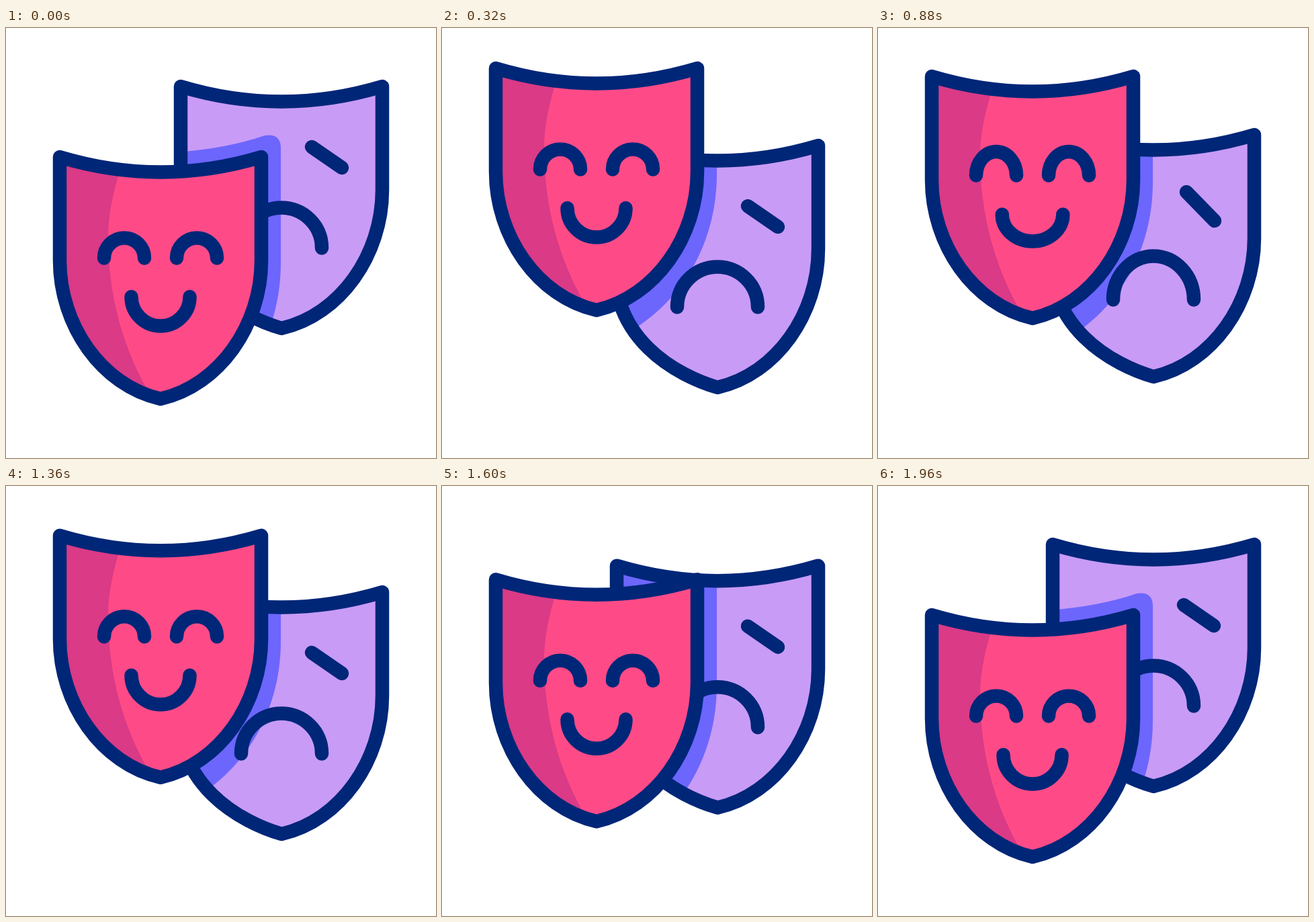
Animation, 640 px wide and 640 px high, one loop 2 s. Source, as an HTML page with a canvas:

```html
<!DOCTYPE html>
<html>
<head>
<meta charset="utf-8">
<style>
html, body { margin: 0; width: 100%; height: 100%; overflow: hidden; background: #fff; }
canvas { display: block; width: 100vmin; height: 100vmin; }
</style>
</head>
<body>
<canvas id="stage" width="640" height="640"></canvas>
<script>
const ctx = document.getElementById('stage').getContext('2d');
const LOOP = 2000, STEP = 40;
const NAVY = '#002678', PINK = '#fe4b87', ROSE = '#da3a86', LILAC = '#c89bf6', BLUE = '#6c66fd';

// Both masks share the top and right side; the sad one bulges at the lower left.
const outline = 'M80 192Q230 237 380 192V346C380 442 318 532 230 552';
const happy = new Path2D(outline + 'C142 532 80 442 80 346Z');
const sad = new Path2D(outline + 'C175 536 60 480 80 346Z');
const shade = new Path2D('M172 205Q152 265 152 310C152 400 175 478 214 545L60 560V180Z');
const shadow = new Path2D('M200 187Q310 186 385 160Q409 156 409 179V350C409 450 358 555 240 604L200 604Z');

// Keys are [time, value] pairs, joined by sine easing.
function tween(t, keys) {
  let [t0, v0] = keys[0];
  for (const [t1, v1] of keys) {
    if (t < t1) return v0 + (v1 - v0) * (1 - Math.cos(Math.PI * Math.max(0, (t - t0) / (t1 - t0)))) / 2;
    [t0, v0] = [t1, v1];
  }
  return v0;
}

const slide = (t, peak, rest) =>
  tween(t, [[80, 0], [320, peak], [530, rest], [1320, rest], [1840, 0]]);

function at(x, y, draw) {
  ctx.save();
  ctx.translate(x, y);
  draw();
  ctx.restore();
}

function fill(path, color) {
  ctx.fillStyle = color;
  ctx.fill(path);
}

const line = d => ctx.stroke(new Path2D(d));

// Half ellipse between two ends; sweep 1 arches up, 0 hangs down.
const arc = (x, y, rx, ry, sweep) => line(`M${x - rx} ${y}A${rx} ${ry} 0 0 ${sweep} ${x + rx} ${y}`);

function draw(t) {
  const front = slide(t, -132, -120);
  const back = slide(t, 88, 72);
  const mood = tween(t, [[640, 0], [760, 1], [1000, 0]]);

  ctx.clearRect(0, 0, 640, 640);
  ctx.strokeStyle = NAVY;
  ctx.lineWidth = 20.5;
  ctx.lineCap = ctx.lineJoin = 'round';

  at(180, back - 105, () => {
    fill(sad, LILAC);
    ctx.save();
    ctx.clip(sad);
    ctx.translate(-180, front - back + 105);
    fill(shadow, BLUE);
    ctx.restore();
    ctx.stroke(sad);
  });
  at(0, back, () => {
    arc(410, 327.5 + 10 * mood, 60, 60 + 10 * mood, 1);
    line(`M${455 + 8 * mood} ${177 - 10 * mood}L${500 + 2 * mood} ${208 + 14 * mood}`);
  });

  at(0, front, () => {
    fill(happy, PINK);
    ctx.save();
    ctx.clip(happy);
    fill(shade, ROSE);
    ctx.restore();
    ctx.stroke(happy);
    for (const x of [176, 284]) arc(x, 342.5 - 6 * mood, 30, 30 + 11 * mood, 1);
    arc(230, 400 - 5 * mood, 43.5 + 3.5 * mood, 43.5 - 7 * mood, 0);
  });
}

const start = performance.now();
function tick() {
  const t = (performance.now() - start) % LOOP;
  draw(Math.floor(t / STEP) * STEP);
  requestAnimationFrame(tick);
}
tick();
</script>
</body>
</html>
```
